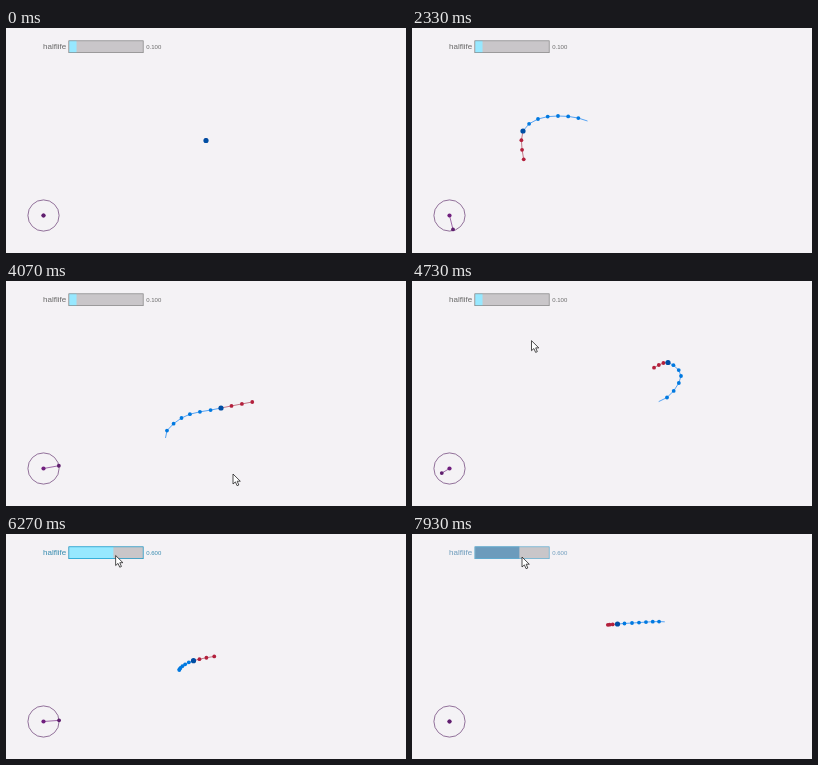
An HTML page with a canvas that plays this animation: 400x225 px, repeating every 8 s.

```html
<!DOCTYPE html>
<html lang="en">
<head>
<meta charset="utf-8">
<title>Spring character</title>
<style>
html, body { margin: 0; width: 100%; height: 100%; overflow: hidden; background: #f4f2f5; }
canvas { display: block; width: 100vw; height: 100vh; }
</style>
</head>
<body>
<canvas id="stage"></canvas>
<script>
const canvas = document.getElementById('stage');
const ctx = canvas.getContext('2d');
const LOOP = 8000, TICK = 1000 / 15, MAX_SPEED = 10.4, HAIRLINE = 0.65;
const STICK = { x: 37.5, y: 187.5, r: 15.6 };
const BAR = { x: 62.5, y: 12.5, w: 75, h: 12.5 };
const LOOKS = {
  normal: { border: '#838383', fill: '#97e8ff', text: '#686868' },
  focused: { border: '#5bb2d9', fill: '#6c9bbc', text: '#6c9bbc' },
  pressed: { border: '#0492c7', fill: '#97e8ff', text: '#368baf' }
};

// Turning points of the walk: tick, x, y
const walk = [
  [23, 200, 112.5], [25, 196, 109.3], [28, 175.5, 93], [31, 146, 88], [33, 126, 91],
  [35, 111, 103], [36, 110, 112.6], [39, 131, 125.5], [44, 181, 137.5], [46, 199, 146.5],
  [49, 203, 170.8], [52, 174.5, 173], [54, 159.5, 157], [57, 175.5, 137], [61, 215, 127],
  [65, 255, 116.5], [68, 269, 95], [71, 256, 81.5], [75, 237, 96.5], [78, 214.5, 113],
  [80, 200, 126], [82, 190, 131], [88, 173.3, 136], [94, 187.5, 126.7], [99, 225, 119.5],
  [102, 248.5, 117], [104, 262.5, 110], [106, 268.5, 101], [110, 261.5, 90], [117, 220, 89],
  [119, 205.5, 90], [122, 194, 91]
];
// Pointer tip: tick, x, y
const pointerKeys = [
  [60, 244, 204], [61, 227, 193], [73, 98, 33], [78, 72, 21],
  [82, 84.2, 21.5], [91, 109.5, 21], [103, 110, 23]
];

function span(keys, n) {
  let i = 0;
  while (i < keys.length - 2 && keys[i + 1][0] <= n) i++;
  const [a, b] = [keys[i], keys[i + 1]];
  return { i, a, b, u: Math.min(1, Math.max(0, (n - a[0]) / (b[0] - a[0]))) };
}

function linear(keys, n) {
  const { a, b, u } = span(keys, n);
  return [1, 2].map(c => a[c] + (b[c] - a[c]) * u);
}

// Slope at a turning point, weighted by the time to its neighbours
function slope(i, c) {
  const before = walk[i - 1], key = walk[i], after = walk[i + 1];
  if (!before) return 0;
  const d0 = key[0] - before[0], s0 = (key[c] - before[c]) / d0;
  if (!after) return s0;
  const d1 = after[0] - key[0], s1 = (after[c] - key[c]) / d1;
  return (s0 * d1 + s1 * d0) / (d0 + d1);
}

function position(n) {
  const { i, a, b, u } = span(walk, n);
  const d = b[0] - a[0], u2 = u * u, u3 = u2 * u;
  return [1, 2].map(c => (2 * u3 - 3 * u2 + 1) * a[c] + (3 * u2 - 2 * u3) * b[c]
    + d * ((u3 - 2 * u2 + u) * slope(i, c) + (u3 - u2) * slope(i + 1, c)));
}

function velocity(n) {
  const prev = position(n - 1), next = position(n + 1);
  return next.map((x, c) => (x - prev[c]) / 2);
}

const damping = halflife => 2 * Math.LN2 / halflife / 15;

// The character lags behind the stick, so the stick leads its velocity
function stickAt(n, halflife) {
  const lead = velocity(n + 1 / damping(halflife));
  const push = lead.map(v => v / MAX_SPEED * (1 + 2 * halflife));
  const size = Math.max(1, Math.hypot(...push));
  return push.map(p => p / size);
}

// Critically damped spring on velocity, `t` ticks ahead
function predict(n, t, halflife, stick) {
  const y = damping(halflife), e = Math.exp(-y * t);
  const [prev, now, next] = [n - 1, n, n + 1].map(position);
  return now.map((x, c) => {
    const v = (next[c] - prev[c]) / 2, a = next[c] - 2 * x + prev[c];
    const goal = stick[c] * MAX_SPEED;
    const j0 = v - goal, j1 = a + j0 * y;
    return e * (-j1 / (y * y) - (j0 + j1 * t) / y) + j1 / (y * y) + j0 / y + goal * t + x;
  });
}

function dot([x, y], r, color) {
  ctx.fillStyle = color;
  ctx.beginPath();
  ctx.arc(x, y, r, 0, Math.PI * 2);
  ctx.fill();
}

function line(points, color) {
  ctx.strokeStyle = color;
  ctx.lineWidth = HAIRLINE;
  ctx.beginPath();
  points.forEach(p => ctx.lineTo(...p));
  ctx.stroke();
}

function drawSlider(value, look) {
  const { x, y, w, h } = BAR, inset = HAIRLINE / 2;
  ctx.fillStyle = '#c9c6c9';
  ctx.fillRect(x, y, w, h);
  ctx.fillStyle = look.fill;
  ctx.fillRect(x + HAIRLINE, y, (w - 2 * HAIRLINE) * value, h);
  ctx.strokeStyle = look.border;
  ctx.lineWidth = HAIRLINE;
  ctx.strokeRect(x + inset, y + inset, w - HAIRLINE, h - HAIRLINE);
  ctx.fillStyle = look.text;
  ctx.font = '8px "Liberation Sans", sans-serif';
  ctx.textAlign = 'right';
  ctx.fillText('halflife', 60.2, 21.2);
  ctx.font = '6px "Liberation Sans", sans-serif';
  ctx.textAlign = 'left';
  ctx.fillText(value.toFixed(3), 140.2, 20.8);
}

function drawStick(stick) {
  const { x, y, r } = STICK, tip = [x + stick[0] * r, y + stick[1] * r];
  ctx.strokeStyle = '#5c2b68';
  ctx.lineWidth = HAIRLINE;
  ctx.beginPath();
  ctx.arc(x, y, r, 0, Math.PI * 2);
  ctx.stroke();
  line([[x, y], tip], '#701f7e');
  dot([x, y], 2.1, '#701f7e');
  dot(tip, 1.9, '#5f1f6e');
}

function drawCharacter(n, halflife, stick) {
  const trail = Array.from({ length: 8 }, (_, i) => position(n - i));
  const ahead = [0, 1, 2, 3].map(t => predict(n, t, halflife, stick));
  line(trail, '#0079f1');
  trail.slice(0, 7).forEach(p => dot(p, 1.9, '#0079e0'));
  line(ahead, '#a8324a');
  ahead.slice(1).forEach(p => dot(p, 1.9, '#b3203c'));
  dot(trail[0], 2.6, '#004ea4');
}

function drawPointer([x, y]) {
  const shape = [[0, 0], [0, 10], [2.4, 7.9], [4.1, 11.7], [5.8, 11], [4.2, 7.2], [7.3, 7.2]];
  ctx.beginPath();
  shape.forEach(([dx, dy]) => ctx.lineTo(x + dx, y + dy));
  ctx.closePath();
  ctx.fillStyle = '#fff';
  ctx.fill();
  ctx.strokeStyle = '#222';
  ctx.lineWidth = 0.8;
  ctx.stroke();
}

function fitCanvas() {
  const scale = window.devicePixelRatio || 1;
  const w = Math.round(innerWidth * scale), h = Math.round(innerHeight * scale);
  if (canvas.width !== w || canvas.height !== h) {
    canvas.width = w;
    canvas.height = h;
  }
  ctx.setTransform(w / 400, 0, 0, h / 225, 0, 0);
}

function render() {
  const n = Math.floor((performance.now() % LOOP + 4) / TICK);
  const pointer = linear(pointerKeys, n);
  const halflife = n < 78 ? 0.1 : Math.min(0.6, (pointer[0] - 64.5) / 75);
  const look = n < 77 ? 'normal' : n >= 78 && n < 95 ? 'pressed' : 'focused';
  const stick = stickAt(n, halflife);

  fitCanvas();
  ctx.fillStyle = '#f4f2f5';
  ctx.fillRect(0, 0, 400, 225);
  drawSlider(halflife, LOOKS[look]);
  drawStick(stick);
  drawCharacter(n, halflife, stick);
  if (n >= 60) drawPointer(pointer);
  requestAnimationFrame(render);
}
render();
</script>
</body>
</html>
```
